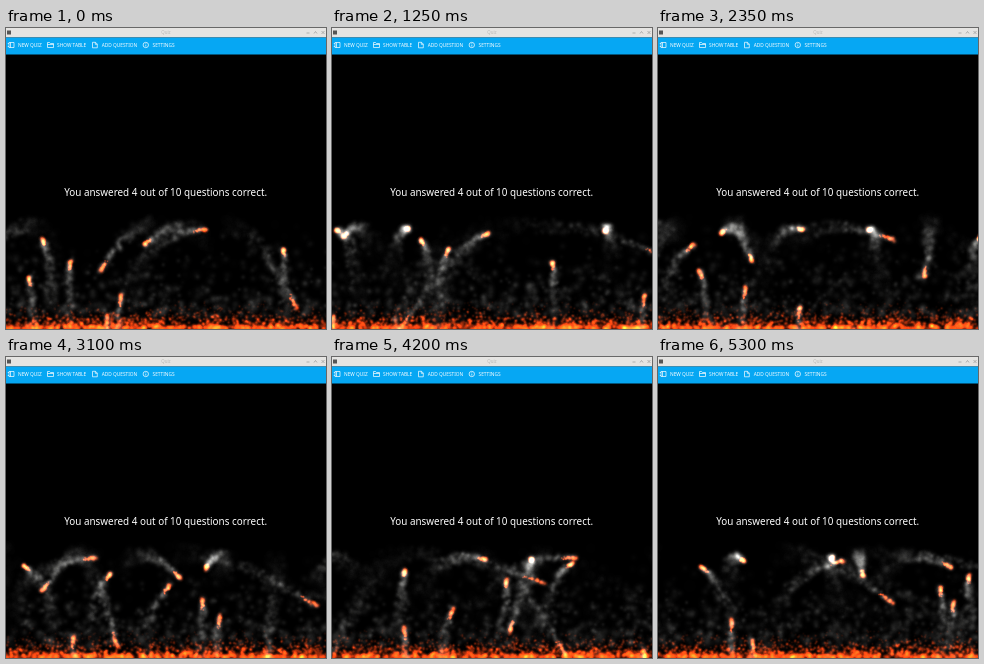
An HTML page with a canvas that plays this animation: 320 px wide and 301 px high, repeating every 5.35 s.

```html
<!DOCTYPE html>
<html lang="en">
<head>
<meta charset="utf-8">
<title>Quiz result</title>
<style>
html, body { margin: 0; width: 100%; height: 100%; overflow: hidden; background: #000; }
canvas, svg { position: absolute; left: 0; top: 0; width: 320px; height: 301px; }
text { font-family: "Noto Sans", "Open Sans", sans-serif; fill: #fff; }
.menu text { font-size: 4.8px; font-weight: 500; }
.icon { fill: none; stroke: #fff; stroke-width: .7; }
</style>
</head>
<body>
<canvas id="stage" width="320" height="301"></canvas>
<svg viewBox="0 0 320 301">
  <rect width="320" height="9.5" fill="#e5e4e2"/>
  <rect x="1" y="2.5" width="4" height="4" fill="#555"/>
  <text x="160" y="6.2" font-size="4.4" text-anchor="middle" style="fill:#b9b8b6">Quiz</text>
  <path d="M300.5 5h3M308 5.5l1.5-2 1.5 2M315.5 3l3 3m0-3l-3 3" fill="none" stroke="#999" stroke-width=".7"/>
  <rect y="9.5" width="320" height="17" fill="#06a7f3"/>
  <g class="menu">
    <text x="12" y="19.2">NEW QUIZ</text>
    <text x="51" y="19.2">SHOW TABLE</text>
    <text x="95.7" y="19.2">ADD QUESTION</text>
    <text x="146.5" y="19.2">SETTINGS</text>
  </g>
  <g class="icon">
    <path d="M3 14.5h5v5h-5zM4.5 14.5v5M1.8 15.5h1.2M1.8 18.5h1.2"/>
    <path d="M41.5 19.5v-5h2l1 1h3v4zM41.5 16.5h6"/>
    <path d="M86.5 14.3h3l1.8 1.8v3.7h-4.8zM89.3 14.3v2h2"/>
    <circle cx="139.8" cy="17" r="2.7"/>
    <path d="M139.8 15.3v.7M139.8 16.6v2"/>
  </g>
  <text x="159.7" y="168.4" font-size="9.88" text-anchor="middle">You answered 4 out of 10 questions correct.</text>
</svg>
<script>
const LOOP = 5350, STEP = 50;
const FIRST = -3.93, EVERY = .25;            // launch times, s
const APEX = 201, FALL = 23.5, RISE = 2.1;   // flight curve
const ctx = document.getElementById("stage").getContext("2d");

// One launch every quarter second: [start x, sideways pull]; null flies out of sight
const launches = [
  [198, 6], null, [165, -6], [60, -9], [207, -8], null, null, null,
  [122, 21], null, [47, -5], [279, -1], [62, 3], [26, -6], [112, 16], [101, -6],
  [106, 7.5], [223, -3], null, [311, 5], [1, 21.5], null, [50, -14], [84, 12.4],
  [140, 23], [196, 1], [211, 11], [67, 3], [174, 0], null, [111, 25], [74, -14],
  [312, -1], [285, -3], [293, 4], [72, 10], [95, 0]
];

function rand(n, k) {
  const v = Math.sin(n * 12.9898 + k * 78.233) * 43758.5453;
  return v - Math.floor(v);
}
const spread = (n, k) => rand(n, k) * 2 - 1;

function glow(rgb) {
  const c = document.createElement("canvas");
  c.width = c.height = 32;
  const g = c.getContext("2d");
  const fill = g.createRadialGradient(16, 16, 0, 16, 16, 16);
  [[0, 1], [.25, .8], [.6, .25], [1, 0]].forEach(([at, a]) => fill.addColorStop(at, `rgba(${rgb},${a})`));
  g.fillStyle = fill;
  g.fillRect(0, 0, 32, 32);
  return c;
}
const white = glow("255,255,250"), fire = glow("255,68,15");

function dot(image, x, y, size, alpha) {
  ctx.globalAlpha = alpha;
  ctx.drawImage(image, x - size / 2, y - size / 2, size, size);
}

// Calls draw(id, age, birth) for every living particle of a steady emitter
function emit(t, rate, life, draw) {
  for (let n = Math.ceil((t - life) * rate); n <= t * rate; n++) draw(n, t - n / rate, n / rate);
}

// Emits particles from a ball while it is in the air: draw(id, age, x, y)
function trail(id, t, rate, life, draw) {
  const [x, pull] = launches[id], launch = FIRST + id * EVERY;
  emit(t, rate, life, (n, age, birth) => {
    const s = birth - launch;
    if (s < 0 || s > 2 * RISE) return;
    draw(n + id * 997, age, x + pull * s * s, APEX + FALL * (s - RISE) ** 2);
  });
}

function haze(t) {
  emit(t, 190, 2.8, (n, age) => {
    const p = age / 2.8;
    const x = rand(n, 1) * 330 - 5 + spread(n, 2) * 8 * age;
    const y = 292 - age * (6 + 31 * rand(n, 3));
    dot(white, x, y, 6 + 7 * rand(n, 4), .075 * Math.min(1, p * 5, (1 - p) * 2));
  });
}

function smoke(id, t) {
  const life = 1.8;
  trail(id, t, 80, life, (n, age, x, y) => {
    const reach = 1.8 + 5 * age;
    const sway = Math.sin(y * .09 + x * .05 + id) * 2 * age;
    dot(white,
      x + spread(n, 5) * reach + sway,
      y + spread(n, 6) * reach - 3 * age,
      6 + 5 * rand(n, 7), .095 * (1 - age / life) ** 1.3);
  });
}

function flare(id, t) {
  const life = .15;
  trail(id, t, 120, life, (n, age, x, y) =>
    dot(fire, x + spread(n, 8) * 1.4, y + spread(n, 9) * 1.4, 7 - 4 * age / life, .45));
}

function flames(t) {
  const life = 3.5;
  emit(t, 330, life, (n, age) => {
    const p = age / life;
    const x = rand(n, 11) * 320 + spread(n, 12) * 2 * age + spread(n, 13) * age * age * .8;
    const y = 301 - (1.2 + 1.5 * rand(n, 14)) * age * age;
    dot(fire, x, y, (7 + 4 * rand(n, 15)) * (1 - p) + 3 * p, .4 * Math.min(1, p * 8, (1 - p) * 2.5));
  });
}

function render(t) {
  const each = draw => launches.forEach((ball, id) => ball && draw(id, t));
  ctx.globalCompositeOperation = "source-over";
  ctx.globalAlpha = 1;
  ctx.fillStyle = "#000";
  ctx.fillRect(0, 0, 320, 301);
  ctx.globalCompositeOperation = "lighter";
  haze(t);
  each(smoke);
  flames(t);
  each(flare);
}

const start = performance.now();
function tick() {
  const ms = (performance.now() - start) % LOOP;
  render(Math.floor(ms / STEP) * STEP / 1000);
  requestAnimationFrame(tick);
}
tick();
</script>
</body>
</html>
```
